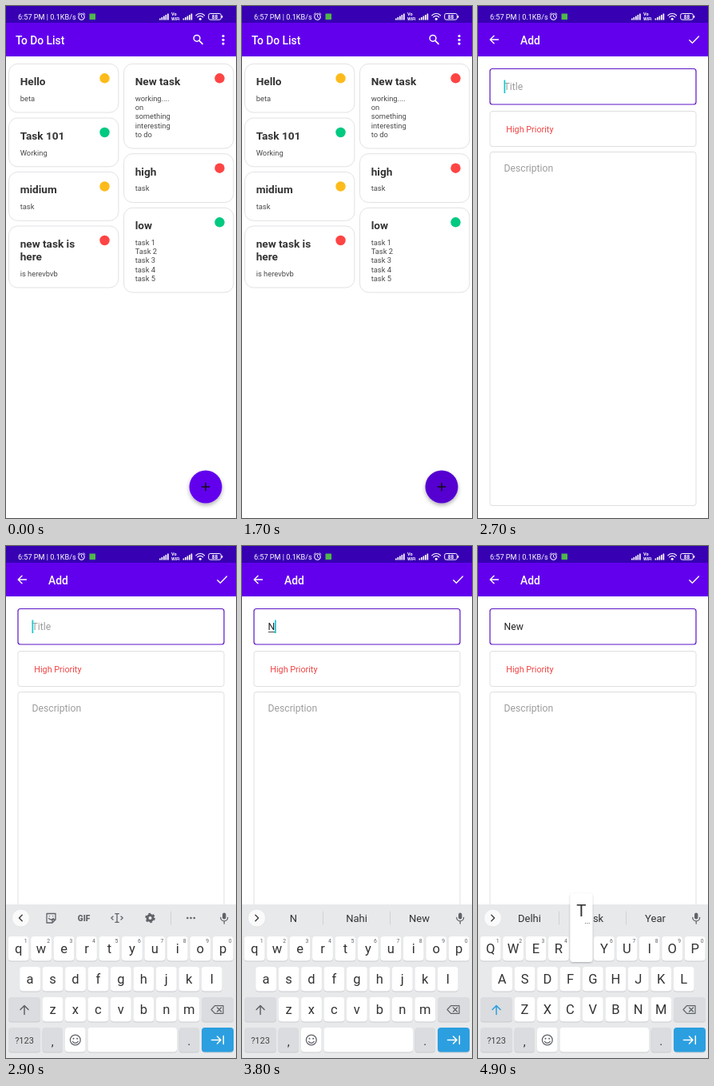
These frames come from a looping animation (288 px wide and 640 px high, 5 s). An HTML page:

```html
<!DOCTYPE html>
<html lang="en">
<head>
<meta charset="utf-8">
<title>To Do List</title>
<style>
  html, body { margin: 0; width: 100%; height: 100%; overflow: hidden; background: #fff; }
  svg { display: block; width: 288px; height: 640px; font-family: Roboto, sans-serif; }
  text { white-space: pre; }
  .line { fill: none; stroke-linecap: round; stroke-linejoin: round; }
</style>
</head>
<body>
<svg id="stage" viewBox="0 0 288 640" xmlns="http://www.w3.org/2000/svg"></svg>
<script>
const LOOP = 5000, STEP = 100;
const PURPLE = '#6200ee', BLUE = '#2b9fe0', INK = '#333', GREY = '#5f6368';
const RED = '#ff4444', GREEN = '#00c980', AMBER = '#fdbb1b';

// Markup helpers
const rect = (x, y, w, h, r, fill, extra = '') =>
  `<rect x="${x}" y="${y}" width="${w}" height="${h}" rx="${r}" fill="${fill}" ${extra}/>`;
const dot = (x, y, r, fill, extra = '') =>
  `<circle cx="${x}" cy="${y}" r="${r}" fill="${fill}" ${extra}/>`;
const label = (x, y, size, fill, str, extra = '') =>
  `<text x="${x}" y="${y}" font-size="${size}" fill="${fill}" ${extra}>${str}</text>`;
const line = (d, stroke, width = 1.3, extra = '') =>
  `<path class="line" d="${d}" stroke="${stroke}" stroke-width="${width}" ${extra}/>`;
const group = (id, body, extra = '') => `<g id="${id}" ${extra}>${body}</g>`;
const MID = 'text-anchor="middle"';

function statusBar() {
  const bars = x => [0, 1, 2, 3, 4]
    .map(i => rect(x + i * 2.5, 15.5 - i * 1.5, 1.7, 2 + i * 1.5, 0.3, '#fff')).join('');
  return rect(0, 0, 288, 21, 0, '#3700b3') +
    label(15, 16.5, 9.1, '#fff', '6:57 PM | 0.1KB/s') +
    dot(94.5, 13.5, 3.7, 'none', 'stroke="#fff" stroke-width="1.1"') +
    line('M94.5 11.5v2.2l1.5 1M90 10.5l2-1.8M99 10.5l-2-1.8', '#fff', 0.9) +
    rect(104.5, 9.5, 7.5, 7.5, 0.5, '#4fb848') +
    bars(192) + bars(221.5) +
    label(207, 12.3, 5.6, '#fff', 'Vo', 'font-weight="700"') +
    label(207, 18, 5.4, '#fff', 'WiFi', 'font-weight="700"') +
    line('M237.8 11.8a7.5 7.5 0 0 1 10.8 0M239.7 13.9a4.8 4.8 0 0 1 7 0', '#fff', 1.2) +
    dot(243.2, 16.3, 1.5, '#fff') +
    rect(253.7, 9.5, 15.6, 7.6, 2, 'none', 'stroke="#fff" stroke-width="1"') +
    rect(270, 12, 1.3, 2.8, 0.5, '#fff') +
    label(261.5, 15.7, 6.4, '#fff', '88', MID + ' font-weight="700"');
}

function toolbar() {
  const title = (x, str) => label(x, 47.5, 13.8, '#fff', str, 'font-weight="500"');
  return rect(0, 21, 288, 42, 0, PURPLE) +
    group('listBar', title(12, 'To Do List') +
      dot(239, 40.3, 3.9, 'none', 'stroke="#fff" stroke-width="1.5"') +
      line('M242 43.3l4 4', '#fff', 1.7) +
      [37.5, 42.3, 47.1].map(y => dot(272, y, 1.6, '#fff')).join('')) +
    group('addBar', title(53, 'Add') +
      line('M25.5 42H15.2M20 37.2L15.2 42l4.8 4.8', '#fff', 1.4) +
      line('M264.8 42.7l3.6 3.6 8-8.2', '#fff', 1.4));
}

function card(x, y, h, color, title, body) {
  const shift = (title.length - 1) * 16;
  return rect(x, y, 137.4, h, 11, '#fff', 'stroke="#e2e2e6" stroke-width="1"') +
    title.map((s, i) => label(x + 14.2, y + 26.8 + i * 16, 13.6, INK, s, 'font-weight="700"')).join('') +
    body.map((s, i) => label(x + 14.2, y + 46.7 + shift + i * 11.2, 9.35, '#484848', s)).join('') +
    dot(x + 120, y + 18, 6.2, color);
}

function listPage() {
  const L = 3.5, R = 147.5;
  return card(L, 72.3, 60.8, AMBER, ['Hello'], ['beta']) +
    card(L, 140, 60.8, GREEN, ['Task 101'], ['Working']) +
    card(L, 207.5, 60.8, AMBER, ['midium'], ['task']) +
    card(L, 275, 77, RED, ['new task is', 'here'], ['is herevbvb']) +
    card(R, 72.3, 105.7, RED, ['New task'], ['working....', 'on', 'something', 'interesting', 'to do']) +
    card(R, 184.7, 60.8, RED, ['high'], ['task']) +
    card(R, 252.3, 105.7, GREEN, ['low'], ['task 1', 'Task 2', 'task 3', 'task 4', 'task 5']) +
    dot(250, 601, 20.5, PURPLE, 'id="fab" filter="url(#drop)"') +
    line('M245.3 601h9.4M250 596.3v9.4', '#111', 1.5);
}

function formPage() {
  const field = (y, h, id) =>
    rect(15, y, 258, h, 3, '#fff', `id="${id}" stroke="#dfdfdf" stroke-width="1"`);
  return field(78.5, 44.5, 'titleBox') + field(131.5, 44, 'priorityBox') + field(182.5, 442, 'descBox') +
    label(32.5, 105.4, 12.2, '#9d9d9d', 'Title', 'id="hint"') +
    label(32.5, 105.4, 12.2, '#222', '', 'id="typed"') +
    rect(32.8, 107, 8, 0.9, 0, '#333', 'id="underline"') +
    rect(32.5, 92.5, 1.7, 16.5, 0, '#10c9cf', 'id="caret"') +
    label(35.3, 157.6, 10.8, '#f04444', 'High Priority') +
    label(32.5, 207.4, 12.2, '#9d9d9d', 'Description');
}

// Letter keys: centre x and top y
const keys = {};
[['qwertyuiop', 15.6, 488], ['asdfghjkl', 30.1, 526], ['zxcvbnm', 58.5, 564]].forEach(([row, x0, y]) =>
  [...row].forEach((c, i) => { keys[c] = { x: x0 + i * 28.45, y }; }));

const keyCap = (x, y, w, fill, id = '') =>
  rect(x, y + 1, w, 30.5, 4, '#c9cbce') + rect(x, y, w, 30.5, 4, fill, id && `id="${id}"`);

function keyboard() {
  const SOFT = '#dadcdf';
  const letters = Object.entries(keys).map(([c, k]) =>
    keyCap(k.x - 12.9, k.y, 25.8, '#fff') +
    label(k.x, k.y + 20.8, 16.5, INK, c, `${MID} class="letter"`)).join('');
  const digits = [...'1234567890'].map((d, i) =>
    label(24.6 + i * 28.45, 495.5, 6.8, GREY, d, MID)).join('');
  const bottom = keyCap(3, 564, 40, SOFT, 'shiftKey') +
    line('M23 585.5v-10.5M18 579.5l5-5 5 5', GREY, 1.5, 'id="shiftArrow"') +
    keyCap(245, 564, 40, SOFT) +
    line('M257 579.5l4.5-4.8h10.5v9.6h-10.5zM264.5 577l5 5M269.5 577l-5 5', GREY, 1.2) +
    keyCap(3, 602, 40, SOFT) + label(23, 621.5, 11, '#444', '?123', MID) +
    keyCap(45.5, 602, 25.5, SOFT) + label(58.3, 625, 15, INK, ',', MID) +
    keyCap(74, 602, 25.5, '#fff') +
    dot(86.8, 617.5, 6.4, 'none', `stroke="${GREY}" stroke-width="1.3"`) +
    dot(84.5, 615.8, 1, GREY) + dot(89.1, 615.8, 1, GREY) +
    line('M83.3 619.3q3.5 4 7 0', GREY, 1.2) +
    keyCap(102.5, 602, 111.5, '#fff', 'space') +
    keyCap(216.5, 602, 25.5, SOFT) + label(229.3, 624, 15, INK, '.', MID) +
    keyCap(245, 602, 40, BLUE) +
    line('M257.5 617.5h11M264.5 613l4.5 4.5-4.5 4.5M272.3 612.5v10', '#fff', 1.5);
  const tools =
    line('M51 459.5h11v7.5l-4 4h-7zM62 467h-4v4M53.5 465.5q3 3 6 0M54.3 462.6v.1M58.7 462.6v.1', GREY, 1.3) +
    label(97.5, 468.6, 10, GREY, 'GIF', MID + ' font-weight="900"') +
    line('M139 460v10M136.8 459.7h4.4M136.8 470.3h4.4M134 463l-2.2 2 2.2 2M144 463l2.2 2-2.2 2', GREY, 1.3) +
    dot(180.5, 465, 3.5, 'none', `stroke="${GREY}" stroke-width="3"`) +
    dot(180.5, 465, 5.4, 'none', `stroke="${GREY}" stroke-width="1.8" stroke-dasharray="2.8 2.855"`) +
    line('M206.5 457v16', '#cfd1d4', 1) +
    [227.3, 231.5, 235.7].map(x => dot(x, 465, 1.3, GREY)).join('');
  const suggestions = line('M101.5 457v16M185.5 457v16', '#cfd1d4', 1) +
    [64.5, 143.5, 222].map(x => label(x, 469.7, 13, INK, '', MID + ' class="suggestion"')).join('');
  return rect(0, 448, 288, 193, 0, '#e8e9eb') +
    dot(18.5, 465, 11, '#fafafa', 'stroke="#dcdddf" stroke-width=".6"') +
    line('', '#444', 1.5, 'id="chevron"') +
    rect(271, 458.5, 4.4, 8, 2.2, GREY) +
    line('M268.8 464.5a4.4 4.4 0 0 0 8.8 0M273.2 469v3', GREY, 1.3) +
    group('tools', tools) + group('suggestions', suggestions) +
    letters + digits + bottom +
    group('popup', rect(-14, -54, 28, 86, 4, '#fff', 'filter="url(#soft)"') +
      label(0, -25, 20.5, INK, '', MID + ' id="popupLetter"') +
      label(7.5, -16.5, 9, INK, '...', MID));
}

const shadow = (id, dy, blur, alpha) =>
  `<filter id="${id}" x="-30%" y="-30%" width="160%" height="170%">
    <feDropShadow dx="0" dy="${dy}" stdDeviation="${blur}" flood-opacity="${alpha}"/></filter>`;

document.getElementById('stage').innerHTML =
  `<defs>${shadow('drop', 2.5, 2.5, 0.32)}${shadow('soft', 1, 1.2, 0.28)}</defs>` +
  rect(0, 0, 288, 640, 0, '#fff') +
  group('list', listPage()) + group('form', formPage()) +
  toolbar() + statusBar() + group('keyboard', keyboard());

const el = {};
document.querySelectorAll('[id]').forEach(node => { el[node.id] = node; });
const letters = document.querySelectorAll('.letter');
const words = document.querySelectorAll('.suggestion');

// Each entry changes part of the state and holds until the next
const START = {
  slide: 288, fab: PURPLE, add: false, focus: false, caret: false, caretX: 32.5,
  kb: 195, caps: false, text: '', under: 0, words: null, popup: '', shift: false, space: false
};
const TIMELINE = [
  [1700, { fab: '#5400d0' }],
  [1800, { slide: 185, add: true, fab: '#4a03b2' }],
  [1900, { slide: 51 }],
  [2000, { slide: 12 }],
  [2100, { slide: 2 }],
  [2200, { slide: 0 }],
  [2600, { focus: true }],
  [2700, { caret: true }],
  [2800, { kb: 75 }],
  [2900, { kb: 0 }],
  [3200, { caret: false }],
  [3500, { caps: true }],
  [3700, { caret: true, popup: 'n' }],
  [3800, { popup: '', caps: false, text: 'N', under: 8.4, caretX: 41, words: ['N', 'Nahi', 'New'] }],
  [3900, { popup: 'e' }],
  [4000, { popup: '', text: 'Ne', under: 14.8, caretX: 47.5, words: ['Ne', 'New', 'Next'] }],
  [4200, { popup: 'w' }],
  [4300, { popup: '', text: 'New', under: 24, caretX: 56.8, words: ['New', 'News', 'Newly'] }],
  [4400, { text: 'New ', under: 0, caretX: 59.6, space: true, words: ['Delhi', 'task', 'year'] }],
  [4500, { space: false }],
  [4600, { shift: true, caps: true, words: ['Delhi', 'Task', 'Year'] }],
  [4700, { shift: false }],
  [4900, { caret: false, popup: 't' }]
];

const stateAt = t => Object.assign({}, START, ...TIMELINE.filter(e => e[0] <= t).map(e => e[1]));
const set = (node, attrs) => Object.entries(attrs).forEach(([k, v]) => node.setAttribute(k, v));
const show = (node, on) => { node.style.display = on ? '' : 'none'; };

function render(t) {
  const s = stateAt(t);
  const cased = c => s.caps ? c.toUpperCase() : c.toLowerCase();

  set(el.list, { transform: `translate(${s.slide - 288} 0)` });
  set(el.form, { transform: `translate(${s.slide} 0)` });
  show(el.list, s.slide > 0);
  show(el.form, s.slide < 288);
  set(el.fab, { fill: s.fab });
  show(el.listBar, !s.add);
  show(el.addBar, s.add);

  set(el.titleBox, { stroke: s.focus ? '#5a14c4' : '#dfdfdf', 'stroke-width': s.focus ? 1.2 : 1 });
  show(el.hint, !s.text);
  el.typed.textContent = s.text;
  set(el.underline, { width: s.under });
  set(el.caret, { x: s.caretX });
  show(el.caret, s.caret);

  show(el.keyboard, s.kb < 195);
  set(el.keyboard, { transform: `translate(0 ${s.kb})` });
  letters.forEach(n => { n.textContent = cased(n.textContent); });
  set(el.shiftArrow, { stroke: s.caps ? BLUE : GREY });
  set(el.shiftKey, { fill: s.shift ? '#c8cbd0' : '#dadcdf' });
  set(el.space, { fill: s.space ? '#dcdde0' : '#fff' });
  set(el.chevron, { d: s.words ? 'M16.8 461.3l3.7 3.7-3.7 3.7' : 'M20.2 461.3l-3.7 3.7 3.7 3.7' });
  show(el.tools, !s.words);
  show(el.suggestions, s.words);
  words.forEach((n, i) => { n.textContent = s.words ? s.words[i] : ''; });

  show(el.popup, s.popup);
  if (s.popup) {
    const k = keys[s.popup];
    set(el.popup, { transform: `translate(${k.x} ${k.y})` });
    el.popupLetter.textContent = cased(s.popup);
  }
}

const begin = performance.now();
let last = -1;
function tick() {
  const t = Math.floor(((performance.now() - begin) % LOOP) / STEP) * STEP;
  if (t !== last) render(last = t);
  requestAnimationFrame(tick);
}
tick();
</script>
</body>
</html>
```
